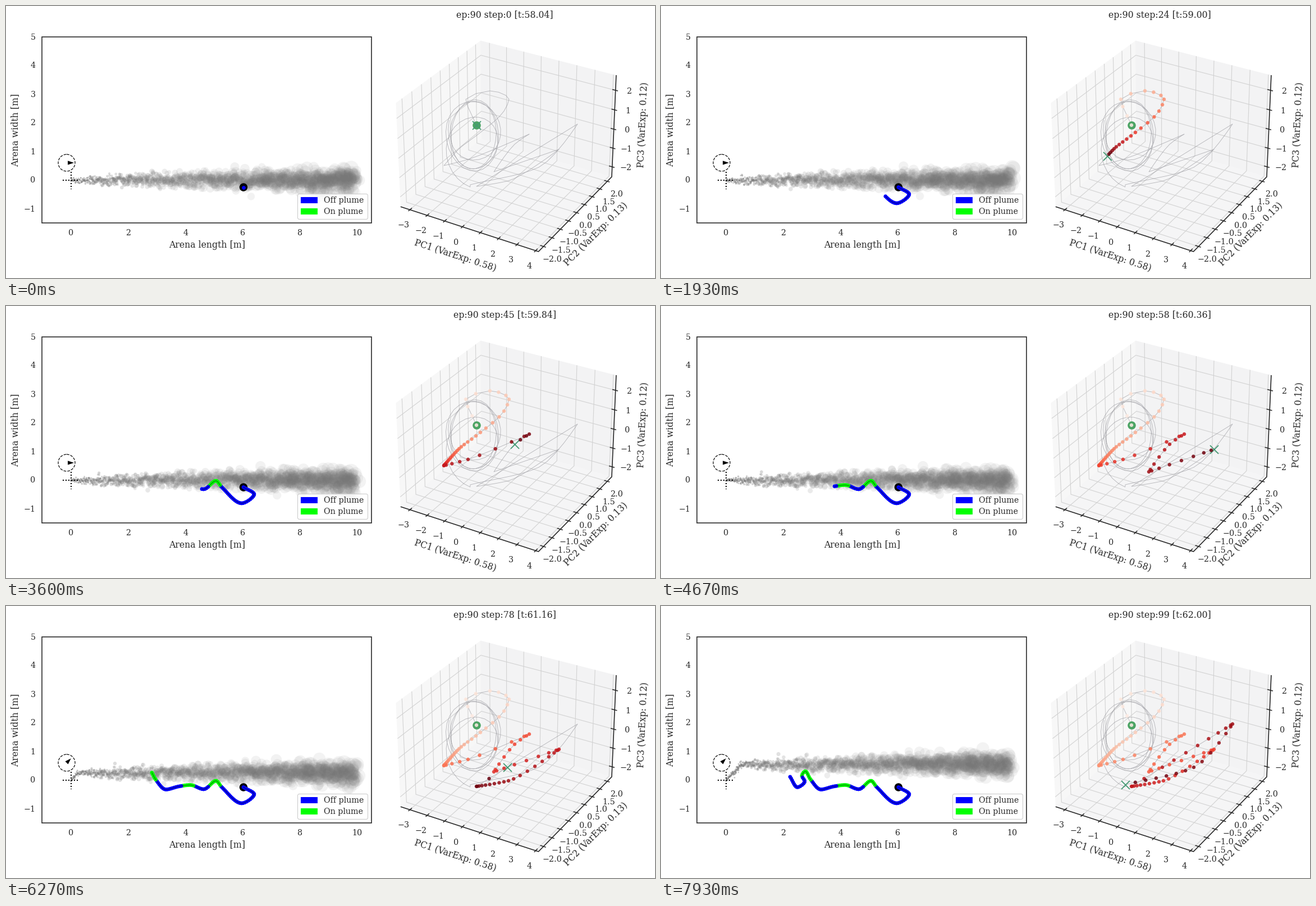
A matplotlib script that plays this animation: 1156x484 px, repeating every 8000 ms.

```python
import numpy as np
import matplotlib.pyplot as plt
from matplotlib.animation import FuncAnimation
from matplotlib.patches import Circle, FancyBboxPatch, Polygon, Rectangle

W, H, DPI = 1156, 484, 100
FRAMES, LOOP_MS = 100, 8000
PT = 72 / DPI                      # points per pixel
INK, GRID, GREEN = "#262626", "#d2d2d2", "#4ca464"
M, AX0, AY0 = 51.04, 115.5, 310    # arena: pixels per metre and origin
T0, DT = 58.04, 0.04               # clock at step 0, seconds per step
WIND, TURN = 0.5, 60.44            # wind speed, time the wind veers by 45 degrees
STEPS = np.arange(FRAMES)

plt.rcParams["font.family"] = "DejaVu Serif"
fig = plt.figure(figsize=(W / DPI, H / DPI), dpi=DPI, facecolor="white")
ax = fig.add_axes([0, 0, 1, 1])
ax.set_xlim(0, W)
ax.set_ylim(H, 0)
ax.axis("off")


def text(x, y, s, px=14.3, ha="center", rot=0):
    return ax.text(x, y, s, fontsize=px * PT, color=INK, ha=ha,
                   va="center", rotation=rot, zorder=8)


def line(pts, color=INK, px=1.5, **kw):
    pts = np.asarray(pts, float).reshape(-1, 2)
    return ax.plot(pts[:, 0], pts[:, 1], color=color, lw=px * PT, **kw)[0]


def size(diameter):
    return (np.asarray(diameter) * PT) ** 2


def num(v):
    return str(v).replace("-", "\u2212")


def track(k, p, t):
    """Smooth path through points p at times k that eases at each reversal."""
    k, p = np.asarray(k, float), np.asarray(p, float)
    d = np.diff(p, axis=0) / np.diff(k)[:, None]
    a, b = d[:-1], d[1:]
    same = a * b > 0
    mid = np.where(same, 2 * a * b / np.where(same, a + b, 1), 0)
    m = np.vstack([d[:1], mid, d[-1:]])
    i = np.clip(np.searchsorted(k, t, side="right") - 1, 0, len(k) - 2)
    h = (k[i + 1] - k[i])[:, None]
    s = (t - k[i])[:, None] / h
    return (p[i] + (p[i + 1] - p[i]) * s * s * (3 - 2 * s)
            + h * s * (1 - s) * (m[i] * (1 - s) - m[i + 1] * s))


def drift(t, since=TURN):
    """Sideways shift from the veered wind."""
    return WIND * np.sqrt(0.5) * np.maximum(t - np.maximum(since, TURN), 0)


# ---------------------------------------------------------------- arena
ax.add_patch(Rectangle((64, 55), 587, 331, fill=False, ec=INK, lw=1.6 * PT, zorder=6))
for v in range(0, 11, 2):
    text(AX0 + M * v, 404.5, num(v))
for v in range(-1, 6):
    text(52.5, AY0 - 51 * v + 0.5, num(v), ha="right")
text(358.5, 425, "Arena length [m]", 15.7)
text(16.5, 221, "Arena width [m]", 15.7, rot=90)

dotted = dict(color="black", px=2, linestyle=(0, (1, 1.5)), zorder=4)
line([(101, 309.5), (131, 309.5)], **dotted)
line([(116, 295), (116, 326)], **dotted)
ax.add_patch(Circle((108, 279), 15, fill=False, ec="black", lw=1.2 * PT,
                    ls=(0, (4, 1.7)), zorder=4))
ARROW = np.array([(0, 0), (2, 0), (2, 3.6), (13, 0), (2, -3.6), (2, 0)])
vane = ax.add_patch(Polygon(ARROW, closed=True, fc="black", ec="none", zorder=4))

ax.add_patch(FancyBboxPatch((521.5, 336.5), 121, 41, boxstyle="round,pad=2,rounding_size=3",
                            fc=(1, 1, 1, 0.8), ec="#cccccc", lw=1.1 * PT, zorder=7))
for y, c, label in ((346, "#0000ff", "Off plume"), (366, "#00ff00", "On plume")):
    ax.add_patch(Rectangle((525, y - 6), 30, 11, fc=c, ec="none", zorder=8))
    text(566, y, label, ha="left")

# the walker keeps an even speed through its turns
TURNS = np.array([(423, 322.5), (442, 335), (420, 351), (384, 322), (374, 311),
                  (352, 326), (328, 318.5), (308, 321), (285, 326.5), (266, 308),
                  (257, 294), (251, 302), (256, 312), (243, 322.5), (230, 304)])
dist = np.append(0, np.cumsum(np.hypot(*np.diff(TURNS, axis=0).T)))
walk = track(99 * dist / dist[-1], TURNS, STEPS)
on_plume = (AY0 - walk[:, 1]) / M - drift(T0 + DT * STEPS) > -0.2
walk_rgb = np.where(on_plume[:, None], (0, 1, 0), (0, 0, 1))
ax.add_patch(Circle((423, 322.5), 7.2, fc="black", ec="none", zorder=4))
trail = ax.scatter([], [], s=size(6.8), lw=0, zorder=5)
core = line([], "black", 1, alpha=0.55, zorder=5.1)

# ---------------------------------------------------------------- plume
rng = np.random.default_rng(90)
born = np.arange(37.5, 62.0, 0.015)
N = len(born)
ga, gb, jx = rng.normal(0, 1, (3, N))
swell = rng.uniform(0.75, 1.25, N)
plume = ax.scatter([], [], lw=0, zorder=2)


def draw_plume(t):
    veer = drift(t, born)
    x = WIND * np.maximum(np.minimum(t, TURN) - born, 0) + veer
    keep = (x > 0) & (x < 9.95)
    swing = 0.2 * (t - born)
    side = 0.082 * x**0.36 * (ga * np.cos(swing) + gb * np.sin(swing))
    alpha = 0.085 + 0.42 * np.exp(-x / 1.6)
    rgba = np.column_stack([np.full((N, 3), 0.47), alpha])
    pts = np.column_stack([AX0 + M * (x + 0.02 * jx * np.sqrt(x)), AY0 - M * (veer + side)])
    plume.set_offsets(pts[keep])
    plume.set_sizes(size(2 * (1.1 + x) * swell)[keep])
    plume.set_facecolors(rgba[keep])


# ---------------------------------------------------------------- 3D box
LO = np.array([-3.52, -2.29, -2.54])
HI = np.array([4.15, 2.30, 2.74])
BOX = np.array([1.143, 1.143, 0.857])
AZ, EL = np.radians(-60), np.radians(30)
EYE = np.array([np.cos(AZ) * np.cos(EL), np.sin(AZ) * np.cos(EL), np.sin(EL)])
RIGHT = np.array([-np.sin(AZ), np.cos(AZ), 0])
UP = np.cross(EYE, RIGHT)


def proj(f):
    """Fractions along the three box edges to stage pixels."""
    p = (np.array(f) - 0.5) * BOX
    k = 2455 / (10 - p @ EYE)
    return np.array([894.6 + k * (p @ RIGHT), 241 - k * (p @ UP)])


def on_box(*corners):
    return [proj(c) for c in corners]


# each pane holds one coordinate fixed
for axis, side, shade in ((0, 0, "#f7f7f7"), (1, 1, "#f3f3f4"), (2, 0, "#f5f5f6")):
    square = [(0, 0), (1, 0), (1, 1), (0, 1)]
    ax.add_patch(Polygon(on_box(*(np.insert(np.array(q), axis, side) for q in square)),
                         fc=shade, ec=shade, lw=0.8, zorder=1))


def ticks(axis, values, path, across, shift):
    """Grid lines along path, tick marks across the first edge, and labels."""
    for v in values:
        u = (v - LO[axis]) / (HI[axis] - LO[axis])
        pts = [np.insert(np.array(q, float), axis, u) for q in path]
        line(on_box(*pts), GRID, 1.1, zorder=1.5)
        edge, step = pts[0] if axis == 0 else np.insert(np.array(across[0], float), axis, u), across[1]
        line(on_box(edge - 0.014 * np.array(step), edge + 0.02 * np.array(step)), zorder=3)
        text(*(proj(edge) + shift), num(v))


ticks(0, range(-3, 5), [(0, 0), (1, 0), (1, 1)], [(0, 0), (0, 1, 0)], (-11, 27.7))
ticks(1, np.arange(-4, 5) / 2, [(1, 0), (0, 0), (0, 1)], [(1, 0), (-1, 0, 0)], (16, 23))
ticks(2, range(-2, 3), [(0, 0), (0, 1), (1, 1)], [(1, 1), (-1, 0, 0)], (24, 2.2))
line(on_box((0, 0, 0), (1, 0, 0), (1, 1, 0), (1, 1, 1)), px=1.6, zorder=3)
text(800.5, 444, "PC1 (VarExp: 0.58)", 15.7, rot=-17.9)
text(1051, 406, "PC2 (VarExp: 0.13)", 15.7, rot=45)
text(1134.5, 211, "PC3 (VarExp: 0.12)", 15.7, rot=87.5)

# turning points of the state: step, x, y
SWINGS = np.array([(0, 838, 212), (3, 819, 166), (5, 862, 151), (8, 896, 166),
                   (10, 887, 187), (14, 845, 225), (20, 807, 254), (33, 780, 284),
                   (37, 823, 273), (42, 932, 228), (45, 906, 246), (50, 869, 295),
                   (58, 985, 255), (67, 895, 311), (76, 838, 321), (78, 893, 287),
                   (86, 1018, 210), (92, 949, 287), (99, 827, 318)])
state = track(SWINGS[:, 0], SWINGS[:, 1:], STEPS)

# the rest of the episode circles on the left
turn = np.linspace(0.02, 4.3, 110)
ang = np.pi / 2 + 2 * np.pi * turn
rx = 50 - 10 * np.sin(1.3 * turn) ** 2
ry = 58 - 9 * np.sin(2.6 * turn)
loops = np.column_stack([833 + rx * np.cos(ang),
                         224 + 42 * np.exp(-1.2 * turn) + ry * np.sin(ang)])
line(np.vstack([state, loops]), "#85858c", 0.9, alpha=0.55, zorder=3)

cross = ax.scatter([], [], marker="x", s=size(15), color="#459a74", lw=1.8 * PT, zorder=3.5)
ax.scatter([838], [212], s=size(14.5), color=GREEN, lw=0, zorder=3.4)
beads = ax.scatter([], [], s=size(6.4), lw=0, alpha=0.85, zorder=3.6)
title = text(888.5, 16.5, "", 15.7)
reds = plt.get_cmap("Reds")


def update(step):
    t = T0 + DT * step
    title.set_text(f"ep:90 step:{step} [t:{t:.2f}]")
    draw_plume(t)

    a = np.pi / 4 if t > TURN else 0
    c, s = np.cos(a), np.sin(a)
    vane.set_xy(ARROW @ np.array([[c, -s], [s, c]]) + (108 - 2 * s, 279 + 2 * s))

    trail.set_offsets(walk[:step + 1])
    trail.set_facecolors(walk_rgb[:step + 1])
    core.set_data(*walk[:step + 1].T)

    beads.set_offsets(state[:step])
    beads.set_facecolors(reds(np.linspace(0.05, 1, max(step, 1)))[:step])
    cross.set_offsets(state[step:step + 1])
    return plume, vane, trail, core, beads, cross, title


anim = FuncAnimation(fig, update, frames=FRAMES, interval=LOOP_MS / FRAMES,
                     repeat=True, repeat_delay=0, blit=False)
plt.show()
```
